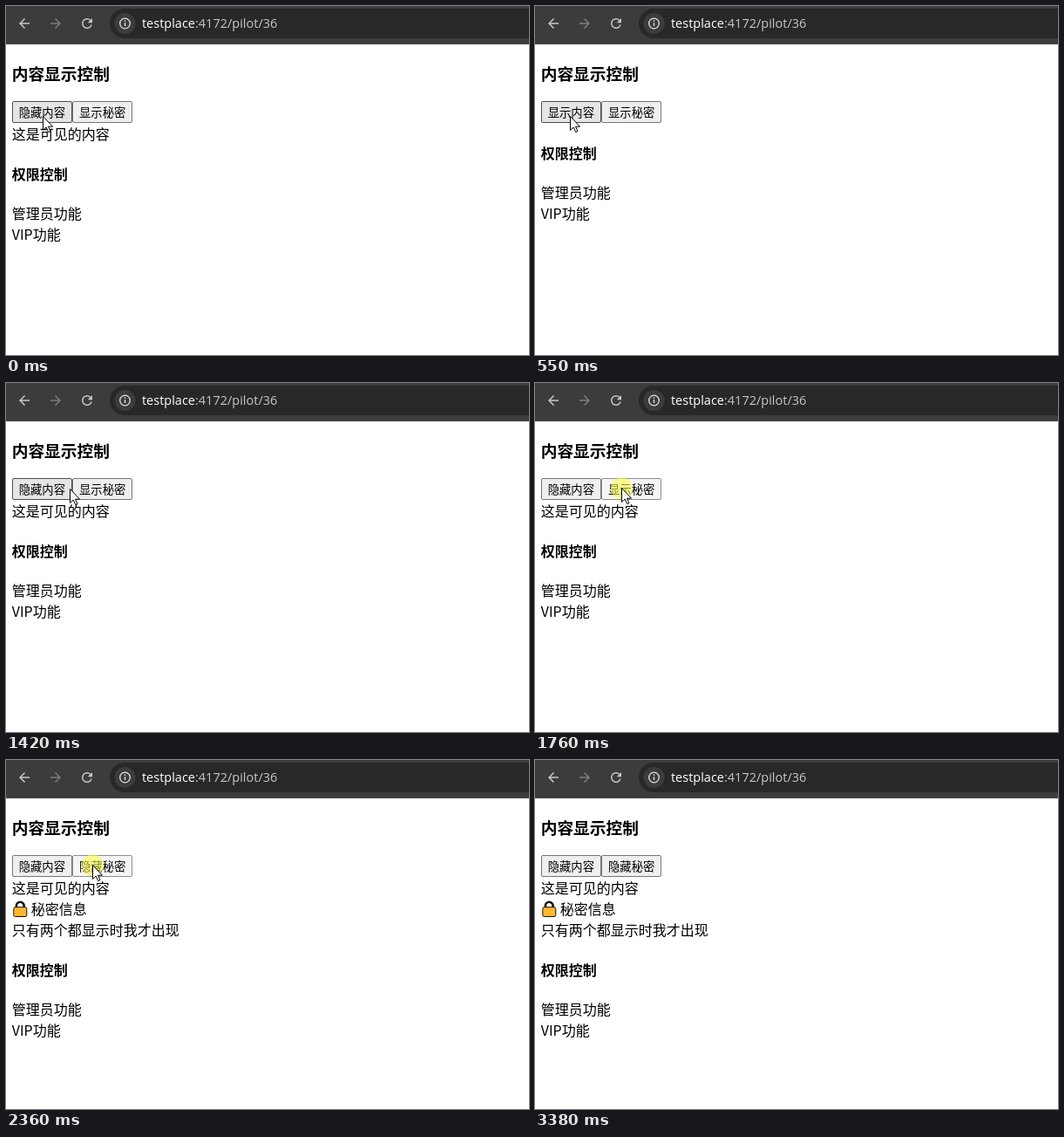
An HTML page that plays this animation: 600 by 400 pixels, repeating every 4100 ms.

```html
<!DOCTYPE html>
<html lang="zh-CN">
<head>
<meta charset="utf-8">
<title>内容显示控制</title>
<style>
@property --content { syntax: "<number>"; inherits: true; initial-value: 1; }
@property --secret { syntax: "<number>"; inherits: true; initial-value: 0; }

html, body { margin: 0; width: 100%; height: 100%; overflow: hidden; }
body {
  position: relative;
  background: #fff;
  color: #000;
  font: 16px/24px "Noto Sans CJK SC", "Noto Sans CJK", sans-serif;
  white-space: nowrap;
  animation: content 4.1s step-end infinite, secret 4.1s step-end infinite;
}

/* Browser bar */
.bar { position: absolute; left: 0; top: 0; width: 600px; height: 44px; }
.url {
  position: absolute; left: 156px; top: 8px;
  font: 14.5px/23px "Open Sans", "Noto Sans", sans-serif;
  color: #c7c7c7;
}
.url b { font-weight: 400; color: #fff; }

/* Page */
main { position: absolute; left: 6.7px; top: 45px; }
h3 { margin: 18px 0 19.44px; font-size: 18.72px; line-height: 27px; }
h4 { margin: 21.28px 0; font-size: 16px; line-height: 24px; }
.buttons { display: flex; height: 25px; }
.button {
  position: relative;
  box-sizing: border-box;
  width: 69.33px; height: 25px;
  border: 1px solid #767676;
  border-radius: 2px;
  background: #efefef;
  font-size: 13.333px; line-height: 19px;
}
.button span { position: absolute; left: 7px; top: 2px; }
.first { animation: first 4.1s step-end infinite; }
.second { animation: second 4.1s step-end infinite; }
.content { --open: var(--content); }
.secret { --open: var(--secret); }
.row { height: calc(24px * var(--open)); overflow: hidden; }
.on { opacity: var(--open); }
.off { opacity: calc(1 - var(--open)); }
.lock { float: left; width: 22px; height: 24px; }

/* Pointer */
.pointer {
  position: absolute; left: 0; top: 0;
  width: 13px; height: 20px;
  overflow: visible;
  animation: move 4.1s step-end infinite;
}
.press { animation: press 4.1s step-end infinite; }

@keyframes content {
  0%, 28.04%, 100% { --content: 1; }
  13.41% { --content: 0; }
}
@keyframes secret {
  0%, 60.73% { --secret: 0; }
  46.34%, 74.39%, 100% { --secret: 1; }
}
@keyframes first {
  0%, 13.41%, 28.04% { background: #e5e5e5; border-color: #4f4f4f; }
  10%, 24.87% { background: #f5f5f5; border-color: #8d8d8d; }
  36.34%, 100% { background: #efefef; border-color: #767676; }
}
@keyframes second {
  0%, 82.43%, 100% { background: #efefef; border-color: #767676; }
  36.34%, 46.34%, 60.73%, 74.39% { background: #e5e5e5; border-color: #4f4f4f; }
  42.92%, 57.56%, 71.21% { background: #f5f5f5; border-color: #8d8d8d; }
}
@keyframes move {
  0% { transform: translate(42px, 126px); visibility: visible; }
  1.7% { transform: translate(40px, 126px); }
  31.46% { transform: translate(46px, 125px); }
  32.92% { transform: translate(58px, 123px); }
  34.63% { transform: translate(73px, 121px); }
  36.34% { transform: translate(88px, 121px); }
  38.04% { transform: translate(99px, 120px); }
  82.43%, 100% { transform: translate(99px, 120px); visibility: hidden; }
}
@keyframes press {
  0%, 13.41%, 28.04%, 46.34%, 60.73%, 74.39%, 100% { opacity: 0; }
  10%, 24.87%, 42.92%, 57.56%, 71.21% { opacity: .55; }
}
</style>
</head>
<body>
<svg class="bar" viewBox="0 0 600 44">
  <defs>
    <path id="arrow" d="M20 11H7.83l5.59-5.59L12 4l-8 8 8 8 1.41-1.41L7.83 13H20z"/>
  </defs>
  <rect width="600" height="44" fill="#3c3c3c"/>
  <rect y="43" width="600" height="1" fill="#474747"/>
  <rect x="119" y="3" width="520" height="34" rx="17" fill="#282828"/>
  <use href="#arrow" transform="translate(12 11) scale(.75)" fill="#c7c7c7"/>
  <use href="#arrow" transform="translate(66 11) scale(-.75 .75)" fill="#7c7c7c"/>
  <path transform="translate(84 11) scale(.75)" fill="#c7c7c7" d="M17.65 6.35A8 8 0 1 0 19.73 14h-2.08A6 6 0 1 1 16.22 7.78L13 11h7V4z"/>
  <circle cx="136.5" cy="20" r="12" fill="#3c3c3c"/>
  <circle cx="136.5" cy="20" r="5.8" fill="none" stroke="#e3e3e3" stroke-width="1.3"/>
  <path d="M136.5 19.3v3.8M136.5 16.6v1.4" stroke="#e3e3e3" stroke-width="1.4"/>
</svg>
<div class="url"><b>testplace</b>:4172/pilot/36</div>

<main>
  <h3>内容显示控制</h3>
  <div class="buttons">
    <div class="button first content"><span class="on">隐藏内容</span><span class="off">显示内容</span></div>
    <div class="button second secret"><span class="on">隐藏秘密</span><span class="off">显示秘密</span></div>
  </div>
  <div class="row content">这是可见的内容</div>
  <div class="row secret">
    <svg class="lock" viewBox="0 0 22 24">
      <path d="M4.9 12V9.2a4.4 4.4 0 0 1 8.8 0V12" fill="none" stroke="#111" stroke-width="2.6"/>
      <rect x="1.8" y="10.7" width="15" height="10.8" rx="1.8" fill="#fcb92f" stroke="#111"/>
    </svg>秘密信息</div>
  <div class="row secret">只有两个都显示时我才出现</div>
  <h4>权限控制</h4>
  <div>管理员功能</div>
  <div>VIP功能</div>
</main>

<svg class="pointer" viewBox="0 0 13 20">
  <circle class="press" cx="0.5" cy="0.7" r="12.5" fill="#ff4"/>
  <path d="M.5.5v16l3.7-3.5 2.5 5.6 2.3-1-2.5-5.4h5z" fill="#fff" stroke="#000"/>
</svg>
</body>
</html>
```
